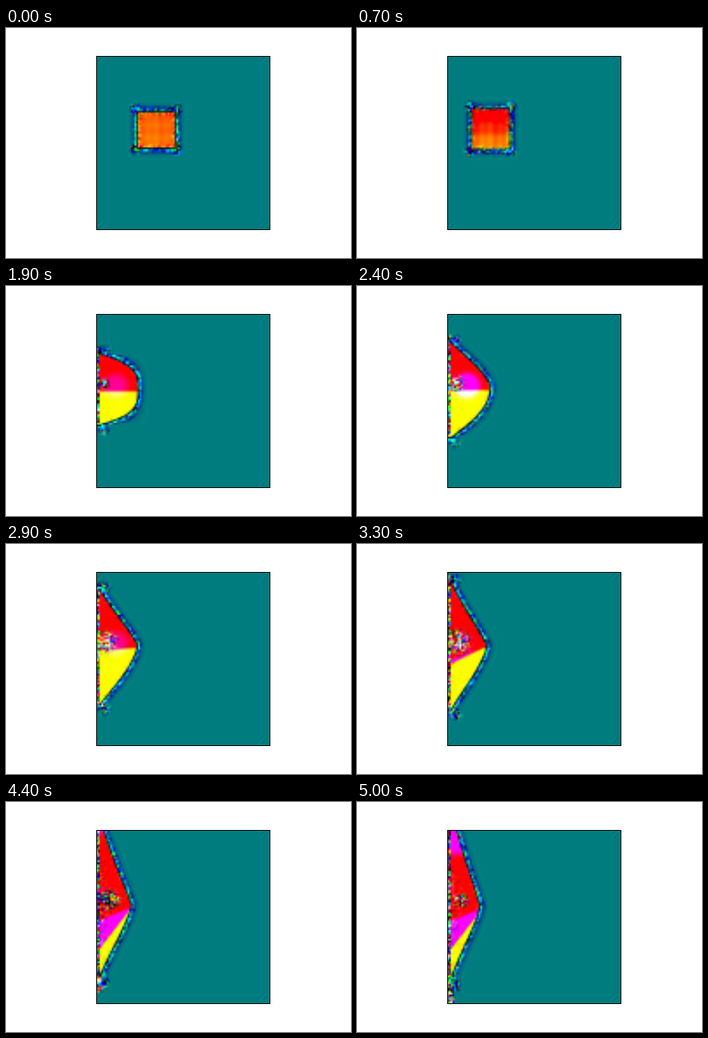
A matplotlib script for the animation above (5.1 s loop, 432x288 px).

```python
import numpy as np
import matplotlib.pyplot as plt
from matplotlib.animation import FuncAnimation

FRAMES = 51
N = 100
LEFT, TOP, SIZE = 112.68, 34.56, 217.44
CELL = SIZE / N
WALL = 117
HIT = 14  # step at which the block reaches the wall
TEAL = np.array([0.0, 0.488, 0.5])

axis = (np.arange(N) + 0.5) * CELL
X, Y = np.meshgrid(LEFT + axis, TOP + axis)

rng = np.random.default_rng(8)
GRAIN = rng.normal(size=(2, N, N, 3))
GRAIN += 0.5 * (np.roll(GRAIN, 1, axis=1) + np.roll(GRAIN, 1, axis=2))


def bump(v, centre, width):
    return np.exp(-((v - centre) / width) ** 2)


def spot(cx, cy, rx, ry):
    return np.exp(-(((X - cx) / rx) ** 2 + ((Y - cy) / ry) ** 2) ** 2)


def ramp(v):
    return np.clip(v + 0.5, 0, 1)


def mix(base, layer, amount):
    amount = amount[..., None]
    return base * (1 - amount) + layer * amount


def bounds(k):
    """Left, right, top and bottom of the body."""
    flight, u = min(k, HIT), max(k - HIT, 0)
    right = 211 - 2.5 * flight - flight ** 2 / 14
    left = max(right - 46, WALL)
    if u:
        right = 166 - 0.5 * abs(u - 9)
    top = 106 - 0.5 * flight - 2.7 * u
    bottom = 150 + 0.14 * flight + 80 * (1 - np.exp(-u / 16))
    return left, right, top, bottom


def middle(k):
    return 125 + 0.14 * max(k - HIT, 0)


def box_distance(k):
    left, right, top, bottom = bounds(k)
    dx = np.maximum(left - X, X - right)
    dy = np.maximum(top - Y, Y - bottom)
    outside = np.hypot(np.maximum(dx, 0), np.maximum(dy, 0))
    return outside + np.minimum(np.maximum(dx, dy), 0)


def spread_distance(k):
    """Signed distance to the bell that spreads along the wall."""
    _, right, top, bottom = bounds(k)
    u, mid = k - HIT, middle(k)
    above = Y < mid
    s = np.where(above, (mid - Y) / (mid - top), (Y - mid) / (bottom - mid))
    power = np.where(above, 1.1 + 9 * np.exp(-u / 3), 1.35 + 9 * np.exp(-u / 4))
    height = np.clip(1 - s ** power, 0, 1) ** (1 + 0.01 * u)
    f = X - WALL - (right - WALL) * height
    d = f / np.hypot(1, np.gradient(f, CELL, axis=0))
    return np.maximum.reduce([d, X - right, top - Y, Y - bottom])


def interior(k, noise):
    """Red is mass, green the vertical and blue the horizontal speed."""
    left, mid, u = bounds(k)[0], middle(k), max(k - HIT, 0)
    along = (X - WALL) / 40

    # upward (red) and downward (yellow) flow part along a tilting line
    tilt = 1 / (1 + np.exp((34 - k) / 2))
    split = mid + 3 + 12 * np.exp(-u / 4) + 52 * tilt * np.clip(1 - along, 0, 1)
    green = 0.45 + (Y - split) * min(0.0025 * np.exp(0.3 * k), 0.3)
    streak = np.cos((X - left) * 0.55) + np.cos((X - left) * 0.23 + 2)
    green += 0.06 * bump(k, 5, 6) * (streak + np.cos((Y - 106) * 0.4))
    green += 0.65 * bump(k, HIT, 3) * spot(154, 120, 8, 8)

    # flow thrown back from the wall
    blue = 1.2 * bump(k, HIT, 3) * spot(122, 132, 9, 8)
    blue += 1.6 * bump(k, 24, 5) * spot(137, 125, 16, 15)
    band = split - Y
    reach = 36 * tilt ** 2 * (1 - along)
    blue += ramp((reach - band) / 4) * ramp(band / 3) * (reach > 1)
    blue += ramp((66 - 4.5 * (50 - k) - Y) / 10)

    color = np.clip(np.stack([np.ones_like(X), green, blue], axis=-1), 0, 1)
    if u:
        speckle = 0.3 * tilt * np.exp((WALL - X) / 7) * bump(Y, mid + 8, 45)
        color += speckle[..., None] * noise
        r = 15 * bump(k, 36, 18)
        eddy = 0.85 * spot(122 + 0.25 * u, 123, r, r)
        color = mix(color, 0.45 + 0.4 * noise, eddy)
    return color


def background(k, d, noise):
    left, right, top, bottom = bounds(k)
    color = np.tile(TEAL, (N, N, 1))

    # ripples and grain that surround the moving body
    amp = 0.25 * bump(d, 2.5, 3.2)
    glow = 0.25
    if k < HIT:
        corners = sum(spot(cx, cy, 7, 7) for cx in (left - 3, right + 2)
                      for cy in (top - 4, bottom + 3))
        amp += 0.2 * corners
        sides = np.abs(2 * X - left - right) > np.abs(2 * Y - top - bottom)
        glow = np.where(sides, 0.35, 0.1)
    else:
        amp += 0.2 * (spot(122, top - 3, 9, 7) + spot(123, bottom + 6, 7, 8))
    color += amp[..., None] * (noise + [-0.5, -0.2, 0.2])
    color[..., 1] += glow * bump(d, 3.2, 1.5) - 0.3 * bump(d, 6.5, 1.6)
    color[..., 2] += 0.25 * bump(d, 3.5, 1.8)
    halo = 0.1 * np.cos(d * 0.9) * np.exp(-np.abs(d - 4) / 5)
    color[..., 1:] += halo[..., None]
    color *= 1 - 0.75 * bump(d, 0.8, 1.4)[..., None]

    # faint marks along the frame
    for cx in (118, 321):
        for cy in (41, 246):
            weak = 0.06 * spot(cx, cy, 6, 5) * np.cos((X + Y) * 0.9)
            color[..., 1:] += weak[..., None]
    color[..., 1:] += 0.012 * bump(X, 318, 2)[..., None]
    return color


def wall(color, k, noise):
    """Turbulent strip where the body touches the wall."""
    top, u = bounds(k)[2], max(k - HIT, 0)
    width = 4.5 + 4 * np.clip((Y - 210) / 25, 0, 1)
    strip = ramp((LEFT + width - X) / 2) * ramp((160 + 2.6 * u - Y) / 4)
    strip *= ramp((Y - top + 9) / 4) * np.clip((k - HIT + 3) / 3, 0, 1)
    return mix(color, 0.36 + 0.35 * noise, strip)


def render(k):
    left = bounds(k)[0]
    phase = 0.22 * k
    noise = GRAIN[0] * np.cos(phase) + GRAIN[1] * np.sin(phase)
    noise = np.roll(noise, round((left - LEFT) / CELL), axis=1)

    d = box_distance(k) if k < HIT else spread_distance(k)
    rough = 0.05 + 0.12 * np.exp(-k / 10)
    inside = interior(k, noise) + rough * bump(d, 0, 4)[..., None] * noise
    color = mix(background(k, d, noise), inside, ramp(-d / 2))
    return np.clip(wall(color, k, noise), 0, 1)


fig, ax = plt.subplots(figsize=(6, 4), dpi=72, facecolor="white")
fig.subplots_adjust(left=0.125, right=0.9, bottom=0.125, top=0.88)
ax.set(xticks=[], yticks=[])
for spine in ax.spines.values():
    spine.set_linewidth(1)
image = ax.imshow(render(0), interpolation="bilinear")


def update(k):
    image.set_data(render(k))
    return [image]


anim = FuncAnimation(fig, update, frames=FRAMES, interval=100, repeat=True,
                     repeat_delay=0)
plt.show()
```
